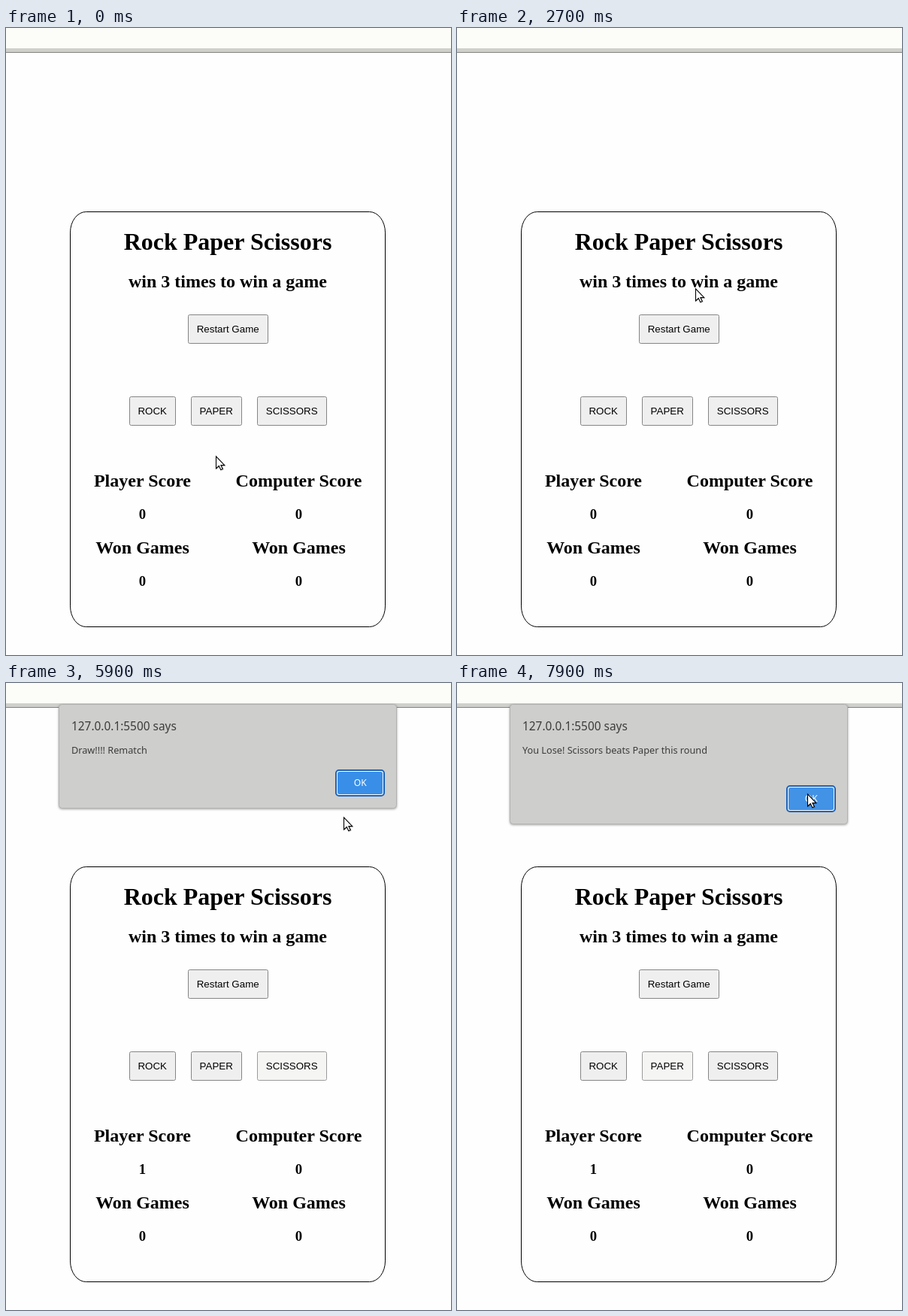
Animation of 592x834 px, one loop 8000 ms. Source, as an HTML page:

```html
<!DOCTYPE html>
<html lang="en">
<head>
<meta charset="utf-8">
<title>Rock Paper Scissors</title>
<style>
  html, body { margin: 0; width: 100%; height: 100%; overflow: hidden; background: #fefefe; }
  svg { position: absolute; left: 0; top: 0; width: 592px; height: 834px; }
  text { white-space: pre; }
  .serif { font-family: "Liberation Serif", "Times New Roman", serif; font-weight: bold; text-anchor: middle; }
  .button { font: 13.333px "Liberation Sans", Arial, sans-serif; text-anchor: middle; }
  #dialog { transform-origin: 295px 107px; }
  #dialog text { font-family: "Noto Sans", sans-serif; fill: #3c3c3c; }
  #dialog #okLabel { fill: #fff; text-anchor: middle; }
  #panel { filter: drop-shadow(0 1px 1.5px rgba(0, 0, 0, .35)); }
</style>
</head>
<body>
<svg id="page" viewBox="0 0 592 834">
  <rect width="592" height="27" fill="#fcfdf8"/>
  <rect y="27" width="592" height="5" fill="#cfcfcb"/>
  <rect y="32" width="592" height="1" fill="#82827f"/>
  <rect x="85.5" y="244.5" width="419" height="552" rx="21" ry="27.6" fill="none" stroke="#000"/>
</svg>
<svg id="dialog" viewBox="0 0 592 834">
  <rect id="panel" x="70.5" y="28.5" width="449" height="138" rx="4" fill="#cececc" stroke="#b2b2b0"/>
  <text x="87" y="63" font-size="15.4">127.0.0.1:5500 says</text>
  <text id="message" x="87" y="94" font-size="12.7"></text>
  <g id="ok">
    <rect x="439" y="116" width="64" height="34" rx="4" fill="#fff" stroke="#1b62b8" stroke-width="2"/>
    <rect id="okFace" x="441" y="118" width="60" height="30" rx="2.5"/>
    <text id="okLabel" x="471.3" y="137" font-size="12.1">OK</text>
  </g>
</svg>
<svg id="pointer" viewBox="0 0 592 834">
  <g id="cursor">
    <path d="M1.5 1.5V18l4-3.6 2.6 5.4 2.7-1.2-2.5-5.2h4.9z" fill="#000" opacity=".2"/>
    <path d="M.5 .8V17l3.8-3.5 2.5 5.2 2.5-1.1-2.4-5h4.9z" fill="#fff" stroke="#000" stroke-width="1.1"/>
  </g>
</svg>
<script>
const LOOP = 8000, STEP = 100, FADE = 250, CENTER = 295;
const $ = id => document.getElementById(id);
const page = $('page');

function add(tag, attrs, content = '') {
  const node = document.createElementNS('http://www.w3.org/2000/svg', tag);
  for (const key in attrs) node.setAttribute(key, attrs[key]);
  node.textContent = content;
  return page.appendChild(node);
}

const heading = (content, x, y, size) =>
  add('text', { class: 'serif', x, y, 'font-size': size }, content);

function scoreColumn(label, x) {
  heading(label, x, 610, 24);
  const score = heading('0', x, 653, 18.72);
  heading('Won Games', x, 699, 24);
  heading('0', x, 742, 18.72);
  return score;
}

function button(label, x, y, width) {
  const middle = x + width / 2 - .3;
  const face = add('rect', { x: x + .5, y: y + .5, width: width - 1, height: 38, rx: 2 });
  add('text', { class: 'button', x: middle, y: y + 24 }, label);
  return {
    aim: [middle + 3, y + 24],
    contains: ([px, py]) => px >= x && px < x + width && py >= y && py < y + 39,
    paint(fill, stroke) {
      face.setAttribute('fill', fill);
      face.setAttribute('stroke', stroke);
    }
  };
}

heading('Rock Paper Scissors', CENTER, 295, 32);
heading('win 3 times to win a game', CENTER, 345, 24);
const playerScore = scoreColumn('Player Score', 181.5);
scoreColumn('Computer Score', 389.5);

const restart = button('Restart Game', 242, 381, 107);
const rock = button('ROCK', 164, 490, 62);
const paper = button('PAPER', 246, 490, 68);
const scissors = button('SCISSORS', 334, 490, 93);
const buttons = [restart, rock, paper, scissors];

// The cursor leaves for OK at "leave"; the dialog has vanished at "gone".
const defaults = { travel: 400, fade: FADE, extra: 0 };
const rounds = [
  { choice: paper, press: 500, open: 607, leave: 1800, gone: 2400, fade: 1, text: 'Draw!!!! Rematch' },
  { choice: rock, press: 3300, open: 3407, leave: 3800, gone: 4750, text: 'You Won! Rock beats Scissors this round' },
  { choice: scissors, press: 5300, open: 5405, leave: 5660, gone: 6450, text: 'Draw!!!! Rematch' },
  { choice: paper, press: 7000, open: 7050, leave: 7300, travel: 600, gone: LOOP + FADE,
    text: 'You Lose! Scissors beats Paper this round', extra: 21 }
].map(round => ({ ...defaults, ...round }));
for (const round of rounds) {
  round.back = round.gone - round.fade;
  round.okAim = [466, 136 + round.extra / 2];
}
const rockRound = rounds[1];

const clamp = v => Math.max(0, Math.min(1, v));

// Ease-out with its own power per axis, which bends the path
function glide(from, to, k, powers) {
  return from.map((v, i) => Math.round(v + (to[i] - v) * (1 - (1 - clamp(k)) ** powers[i])));
}

function cursorAt(t) {
  const next = rounds.find(r => r.press > t);
  const last = rounds.findLast(r => r.press <= t);
  if (last && t <= last.back) {
    return glide(last.choice.aim, last.okAim, (t - last.leave) / last.travel, [1.7, 2.4]);
  }
  const from = last ? last.okAim : [279, 569];
  const begin = last ? last.back : 0;
  return glide(from, next.choice.aim, (t - begin) / (next.press - begin), [2, 2]);
}

function drawDialog(round, t, [x, y]) {
  const shown = round ? Math.min(clamp((t - round.open) / FADE), clamp((round.gone - t) / round.fade)) : 0;
  const dialog = $('dialog');
  dialog.style.opacity = shown;
  if (!shown) return;
  const away = 1 - shown, extra = round.extra;
  dialog.style.transform = away
    ? `translateY(${-16.5 * away}px) perspective(500px) rotateX(${4.5 * away}deg) scale(${1 + .005 * away})`
    : 'none';
  $('message').textContent = round.text;
  $('panel').setAttribute('height', 138 + extra);
  $('ok').setAttribute('transform', `translate(0 ${extra})`);
  const hover = x >= 438 && x < 504 && y >= 115 + extra && y < 151 + extra;
  $('okFace').setAttribute('fill', hover ? '#4292e6' : '#398ee7');
}

function draw(time) {
  const t = Math.floor(time % LOOP / STEP) * STEP;
  const cursor = cursorAt(t);
  const round = rounds.find(r => t >= r.press && t < r.gone);
  for (const b of buttons) {
    if (round && round.choice === b && t < round.back) b.paint('#f5f5f4', '#9a9a9a');
    else if (!round && b.contains(cursor)) b.paint('#e5e5e5', '#5a5a5a');
    else b.paint('#efefef', '#858585');
  }
  playerScore.textContent = t > rockRound.back ? '1' : '0';
  drawDialog(round, t, cursor);
  $('cursor').setAttribute('transform', `translate(${cursor})`);
}

const start = performance.now();
function tick() {
  draw(performance.now() - start);
  requestAnimationFrame(tick);
}
tick();
</script>
</body>
</html>
```
